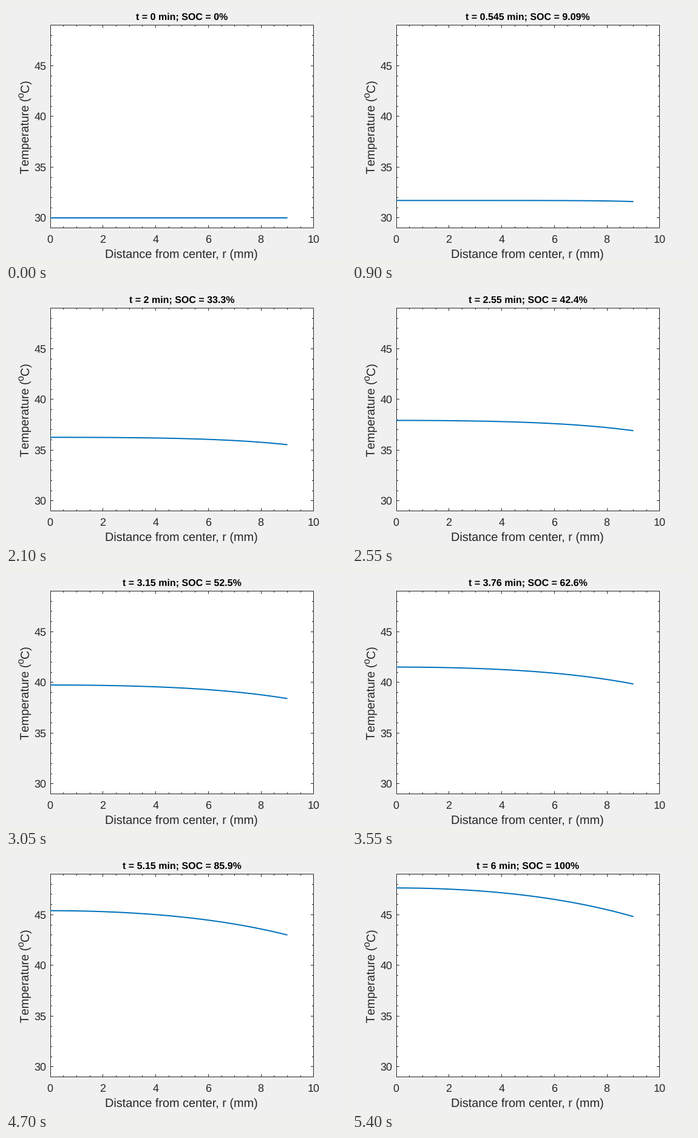
A matplotlib script for the animation above (5.45 s loop, 560x420 px).

```python
import numpy as np
import matplotlib.pyplot as plt
from matplotlib.animation import FuncAnimation

W, H, DPI = 560, 420, 100
STEPS, HOLD = 99, 9            # time steps, extra frames on the first one
T_END = 6.0                    # minutes
RADIUS = 9.0                   # mm
DARK = "0.15"

plt.rcParams["font.family"] = "Liberation Sans"
plt.rcParams["text.hinting"] = "none"
plt.rcParams["path.snap"] = False


def px(n):
    """Pixels to points."""
    return n * 72 / DPI


def to_x(r):
    return 72.9 + 43.4 * r


def to_y(temp):
    return 349 - 16.7 * (temp - 30)


def heat_profiles(n=60, sub=10, heat=3.15, diff=0.0609, biot=0.45):
    """Radial conduction in a heated cylinder cooled at its surface."""
    x = np.linspace(0, 1, n + 1)
    mid = (x[1:] + x[:-1]) / 2
    edges = np.concatenate(([0], mid, [1]))
    vol = np.diff(edges**2) / 2
    flow = mid * n
    a = np.diag(flow, 1) + np.diag(flow, -1)
    a -= np.diag(a.sum(axis=1))
    a[-1, -1] -= biot
    a *= diff / vol[:, None]

    dt = T_END / STEPS / sub
    eye = np.eye(n + 1)
    left = eye - dt / 2 * a
    step = np.linalg.solve(left, eye + dt / 2 * a)
    gain = np.linalg.solve(left, np.full(n + 1, dt * heat))

    rise = np.zeros(n + 1)
    out = [rise]
    for _ in range(STEPS):
        for _ in range(sub):
            rise = step @ rise + gain
        out.append(rise)
    return x * RADIUS, 30 + np.array(out)


radius, temps = heat_profiles()

fig = plt.figure(figsize=(W / DPI, H / DPI), dpi=DPI, facecolor="0.94")
ax = fig.add_axes([0, 0, 1, 1])
ax.set_xlim(0, W)
ax.set_ylim(H, 0)
ax.axis("off")

# Plot box, in pixel coordinates
X0, X1, Y0, Y1 = 73.5, 506.5, 31.5, 365.5
ax.add_patch(plt.Rectangle((X0, Y0), X1 - X0, Y1 - Y0, fc="white", ec="none"))


def stroke(xs, ys):
    ax.plot(xs, ys, color=DARK, lw=px(1), solid_capstyle="butt", zorder=3)


def label(x, y, s, size, ha="center", **kw):
    kw.setdefault("color", DARK)
    return ax.text(x, y, s, fontsize=px(size), ha=ha, va="baseline", **kw)


for x in (X0, X1):
    stroke([x, x], [Y0 - 0.5, Y1 + 0.5])
for y in (Y0, Y1):
    stroke([X0 - 0.5, X1 + 0.5], [y, y])

for i in range(1, 20):
    x = np.floor(to_x(i / 2)) + 0.5
    size = 4.5 if i % 4 == 0 else 2.5
    stroke([x, x], [Y1, Y1 - size])
    stroke([x, x], [Y0, Y0 + size])
for t in range(30, 49):
    y = np.floor(Y1 - 16.7 * (t - 29)) + 0.5
    size = 4.5 if t % 5 == 0 else 2.5
    stroke([X0, X0 + size], [y, y])
    stroke([X1, X1 - size], [y, y])

for r in range(0, 11, 2):
    label(to_x(r) - 0.4, 390.3, str(r), 18)
for t in range(30, 50, 5):
    label(66.3, Y1 - 16.7 * (t - 29) + 6.1, str(t), 18, ha="right")

label(289.1, 414.6, "Distance from center, r (mm)", 19.9)
up = dict(rotation=90, rotation_mode="anchor")
label(37.9, 275.5, "T", 19.7, ha="left", **up)
label(37.9, 150.8, "emperature (", 19.7, ha="right", **up)
label(29.4, 150.8, "o", 15.8, ha="left", **up)
label(37.9, 142, "C)", 19.7, ha="left", **up)

title = label(289.5, 23.3, "", 16, color="black", weight="bold")
curve, = ax.plot([], [], color="#0072BD", lw=px(2), solid_capstyle="butt",
                 zorder=4)


def draw(i):
    k = max(0, i - HOLD)
    done = k / STEPS
    title.set_text(f"t = {T_END * done:.3g} min; SOC = {100 * done:.3g}%")
    curve.set_data(to_x(radius), to_y(temps[k]))
    return title, curve


anim = FuncAnimation(fig, draw, frames=STEPS + HOLD + 1, interval=50,
                     repeat=True, repeat_delay=0, blit=False)
plt.show()
```
